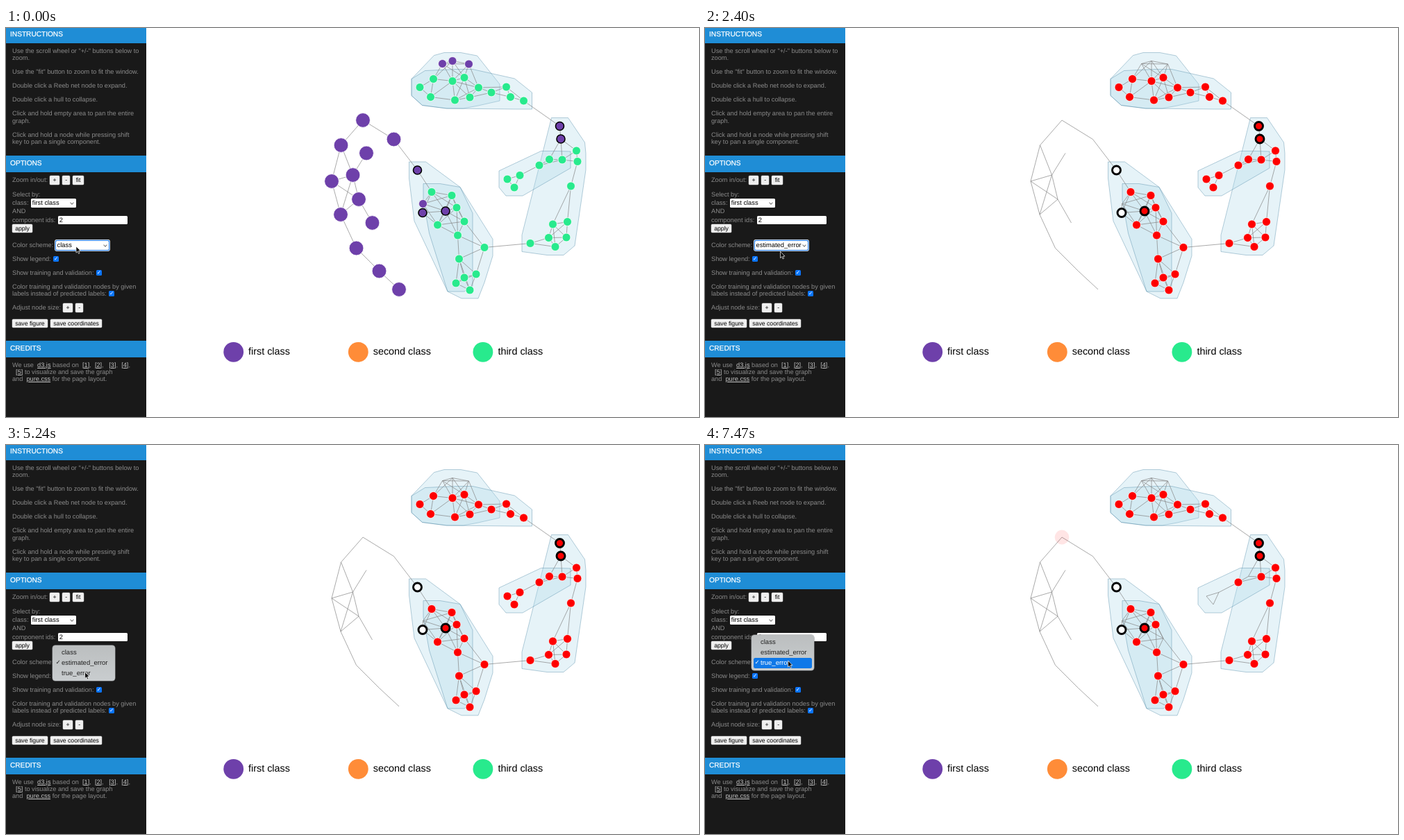
Animation, 998 px wide and 561 px high, one loop 8000 ms. Source, as an HTML page:

```html
<!DOCTYPE html>
<html lang="en">
<head>
<meta charset="utf-8">
<title>Reeb net viewer</title>
<style>
html, body { margin: 0; width: 100%; height: 100%; overflow: hidden; background: #fff; }
body { font-family: "Liberation Sans", Arial, sans-serif; text-rendering: geometricPrecision; }
svg { position: absolute; left: 0; top: 0; }
aside { position: absolute; width: 202px; height: 561px; overflow: hidden; background: #191919; }
section { position: absolute; width: 100%; }
h2 { margin: 0 0 6px; padding-left: 6px; font: 10.15px/24px "Liberation Sans", Arial, sans-serif;
  color: #fff; background: #1f8dd6; -webkit-text-stroke: .25px #fff; }
p { margin: 0 0 9.7px 9px; font-size: 9.2px; line-height: 10.3px; color: #8b8b8b; white-space: pre; }
.form { margin-bottom: 13px; line-height: 12.2px; }
.save { margin-top: 12px; }
u { color: #c4c4c4; }
p b, p i { display: inline-block; box-sizing: border-box; overflow: hidden; height: 12.5px; margin: -2px .8px;
  vertical-align: -1.5px; font: 8.7px/12.5px "Liberation Sans", Arial, sans-serif; color: #000; border-radius: 1.5px; }
p b { padding: 0 4.2px; background: #efefef; box-shadow: 0 0 0 .5px #777; }
p i { position: relative; padding-left: 2px; font-size: 9.3px; background: #fff; }
p .pick::after { content: ""; position: absolute; right: 3.5px; top: 3.5px; width: 3px; height: 3px;
  border: solid #777; border-width: 0 .9px .9px 0; transform: rotate(45deg); }
p .focus { box-shadow: 0 0 0 1.3px #2b7de0, 0 0 0 2px #fff; }
p .check { width: 8px; height: 8px; margin: 0 .8px; padding: 0; vertical-align: -.6px;
  font: 7.5px/8px "DejaVu Sans", sans-serif; text-align: center; color: #fff; background: #0b75ff; }
#menu { position: absolute; left: 67px; box-sizing: border-box; width: 89.5px; height: 51px; padding: 2.7px 3px;
  border-radius: 4px; background: linear-gradient(#bbbebf, #c9cdcf); box-shadow: 0 0 0 .5px #8d9092; }
#menu div { position: relative; padding-left: 10px; border-radius: 2.5px; font-size: 9.5px; line-height: 15px; color: #222; }
#menu .active { color: #fff; background: #0f78e8; }
#menu .ticked::before { content: "✓"; position: absolute; left: 1.5px; font: 8.5px/15px "DejaVu Sans", sans-serif; }
.hull { fill: rgba(173, 216, 230, .3); stroke: rgba(70, 130, 160, .4); stroke-linejoin: round; }
.edge { stroke: #858585; stroke-width: .7; }
.legend { font-size: 14.4px; }
</style>
</head>
<body>
<svg id="graph" width="998" height="561"></svg>
<aside>
<section style="top: -2px"><h2>INSTRUCTIONS</h2>
<p>Use the scroll wheel or "+/-" buttons below to
zoom.</p>
<p>Use the "fit" button to zoom to fit the window.</p>
<p>Double click a Reeb net node to expand.</p>
<p>Double click a hull to collapse.</p>
<p>Click and hold empty area to pan the entire
graph.</p>
<p>Click and hold a node while pressing shift
key to pan a single component.</p></section>
<section style="top: 184px"><h2>OPTIONS</h2>
<p>Zoom in/out: <b>+</b> <b>-</b> <b>fit</b></p>
<p class="form">Select by:
class: <i class="pick" style="width: 65px">first class</i>
AND
component ids: <i style="width: 100.5px">2</i>
<b style="margin-left: 0">apply</b></p>
<p>Color scheme: <i id="chosen" class="pick focus" style="width: 76.5px"></i></p>
<p>Show legend: <i class="check">✓</i></p>
<p>Show training and validation: <i class="check">✓</i></p>
<p>Color training and validation nodes by given
labels instead of predicted labels: <i class="check">✓</i></p>
<p>Adjust node size: <b>+</b> <b>-</b></p>
<p class="save"><b style="margin-left: 0">save figure</b> <b>save coordinates</b></p></section>
<section style="top: 450.5px"><h2>CREDITS</h2>
<p>We use  <u>d3.js</u> based on  <u>[1]</u>,  <u>[2]</u>,   <u>[3]</u>,  <u>[4]</u>,
  <u>[5]</u> to visualize and save the graph
and  <u>pure.css</u> for the page layout.</p></section>
</aside>
<div id="menu"></div>
<svg width="998" height="561"><path id="cursor" d="M0 0v9.2l2.1-2 1.5 3.3 1.5-.7-1.5-3.2h2.9z" stroke="#fff" stroke-width=".7"/></svg>
<script>
const LOOP = 8000, HULL_PAD = 12, BRIDGE_REACH = 70;
const PURPLE = '#6e40aa', ORANGE = '#ff8c38', GREEN = '#28ea8d', RED = '#fe0000';
const SCHEMES = ['class', 'estimated_error', 'true_error'];

// The first `purple` nodes are first class, the first `sure` of them have no estimated error;
// `right` nodes have no true error, `ends` join only their nearest neighbour.
const clusters = [
  { reach: 60, radius: 10.4, purple: 12, sure: 12, ends: [3, 8],
    nodes: [[514, 133], [558.5, 160.5], [482.5, 169], [519, 180.5], [499.5, 212], [469, 221],
      [508, 247], [482, 269], [527.5, 281], [504.5, 317.5], [537.5, 350.5], [566, 377]] },
  { reach: 48, radius: 6, purple: 4, sure: 3, rings: [0, 2, 3], right: [8], hulls: [[0], [4, 13]],
    nodes: [[592.5, 205], [600.5, 253.5], [600, 266.5], [633, 264], [613, 236.5], [642, 241.5],
      [649, 259], [621.5, 284], [660, 279], [650.5, 299], [652.5, 333], [660, 360], [648, 368],
      [689, 316.5], [677, 355], [668, 378]] },
  { reach: 41, radius: 6, purple: 3, sure: 3, hulls: [[0, 12], [3]],
    nodes: [[628.5, 51.5], [643, 47.5], [666.5, 52], [615.5, 73.5], [643, 76.5], [660, 71.5], [596, 85.5],
      [611.5, 99.5], [646.5, 104], [668, 100], [680.5, 86], [699, 93], [720.5, 85], [726.5, 99.5], [745.5, 105]] },
  { reach: 38, radius: 6, purple: 2, sure: 0, rings: [0, 1], right: [12, 14, 15, 16], hulls: [[0, 12], [11]],
    links: [[4, 5], [4, 6]],
    nodes: [[797.5, 141.5], [799, 160], [821.5, 177], [823, 192.5], [813.5, 228], [808.5, 279.5], [787.5, 283],
      [781.5, 302.5], [807, 302], [755, 310.5], [791, 315.5], [801, 190], [782.5, 189.5], [768, 198],
      [740, 212.5], [722, 218], [732, 230]] }
];

const dist = (a, b) => Math.hypot(a[0] - b[0], a[1] - b[1]);
const line = (a, b) => `<line class="edge" x1="${a[0]}" y1="${a[1]}" x2="${b[0]}" y2="${b[1]}"/>`;

function convexHull(points) {
  const half = pts => {
    const out = [];
    for (const p of pts) {
      while (out.length > 1) {
        const [a, b] = out.slice(-2);
        if ((b[0] - a[0]) * (p[1] - a[1]) - (b[1] - a[1]) * (p[0] - a[0]) > 0) break;
        out.pop();
      }
      out.push(p);
    }
    return out.slice(0, -1);
  };
  const sorted = [...points].sort((a, b) => a[0] - b[0] || a[1] - b[1]);
  return [...half(sorted), ...half(sorted.reverse())];
}

function hull(nodes) {
  const pad = [-HULL_PAD, HULL_PAD];
  const corners = nodes.flatMap(([x, y]) => pad.flatMap(dx => pad.map(dy => [x + dx, y + dy])));
  return `<polygon class="hull" points="${convexHull(corners).join(' ')}"/>`;
}

function innerEdges({ nodes, reach, ends = [], links = [] }) {
  const out = links.map(([i, j]) => line(nodes[i], nodes[j]));
  nodes.forEach((a, i) => {
    const others = nodes.filter(n => n !== a);
    if (ends.includes(i)) out.push(line(a, others.sort((p, q) => dist(a, p) - dist(a, q))[0]));
    else nodes.forEach((b, j) => {
      if (j > i && !ends.includes(j) && dist(a, b) < reach) out.push(line(a, b));
    });
  });
  return out;
}

// Neighbouring clusters are joined by their closest pair of nodes.
function bridges() {
  return clusters.flatMap((c, i) => clusters.slice(i + 1).map(other => {
    const pairs = c.nodes.flatMap(a => other.nodes.map(b => [a, b]));
    const [a, b] = pairs.reduce((best, p) => dist(...p) < dist(...best) ? p : best);
    return dist(a, b) < BRIDGE_REACH ? line(a, b) : '';
  }));
}

const legend = [[PURPLE, 'first class'], [ORANGE, 'second class'], [GREEN, 'third class']].map(([color, name], i) =>
  `<circle cx="${327.7 + 179.6 * i}" cy="467.3" r="14.4" fill="${color}"/>
   <text class="legend" x="${349 + 179.7 * i}" y="471.2">${name}</text>`);

const byId = id => document.getElementById(id);
byId('graph').innerHTML = [
  ...clusters.flatMap(c => (c.hulls || []).map(range => hull(c.nodes.slice(...range)))),
  ...clusters.flatMap(innerEdges),
  ...bridges(),
  ...clusters.flatMap(c => c.nodes.map(([x, y]) => `<circle class="node" cx="${x}" cy="${y}" r="${c.radius}"/>`)),
  ...legend
].join('');
byId('menu').innerHTML = SCHEMES.map(s => `<div>${s}</div>`).join('');

const circles = [...document.querySelectorAll('.node')];
const items = [...byId('menu').children];
const states = clusters.flatMap(c => c.nodes.map((_, i) => ({
  purple: i < c.purple,
  sure: i < c.sure,
  ring: (c.rings || []).includes(i),
  right: (c.right || []).includes(i)
})));

let shown = -1;
function applyScheme(scheme) {
  if (scheme === shown) return;
  shown = scheme;
  byId('chosen').textContent = SCHEMES[scheme];
  states.forEach((n, i) => {
    const { style } = circles[i];
    const clear = scheme > 0 && (n.sure || (scheme === 2 && n.right));
    const faint = scheme === 2 && i === 0;
    style.fill = !scheme ? (n.purple ? PURPLE : GREEN) : clear && n.ring ? '#fff' : RED;
    style.fillOpacity = faint ? .1 : clear && !n.ring ? 0 : 1;
    style.stroke = n.ring ? '#000' : clear ? 'none' : '#fff';
    style.strokeWidth = n.ring ? (scheme ? 2.9 : 1.6) : .8;
  });
}

// Each menu picks the next scheme: times of opening, hovering that row, pressing and releasing.
const picks = [[560, 1400, 1740, 2070], [3870, 4600, 5240, 5670], [7370, LOOP, LOOP, LOOP]];
const FADE_DELAY = 80, FADE = 200, APPLY_DELAY = 200;

function drawMenu(t) {
  const ticked = picks.findIndex(p => t >= p[0] && t < p[3] + FADE_DELAY + FADE);
  const menu = byId('menu');
  menu.style.display = ticked < 0 ? 'none' : '';
  if (ticked < 0) return;
  const [, hover, press, release] = picks[ticked];
  const active = t < hover ? ticked : t < press || t >= release ? ticked + 1 : -1;
  menu.style.top = 304 - 15 * ticked + 'px';
  menu.style.opacity = Math.min(1, 1 - (t - release - FADE_DELAY) / FADE);
  items.forEach((item, i) => {
    item.classList.toggle('active', i === active);
    item.classList.toggle('ticked', i === ticked);
  });
}

// Cursor moves: start, end, x, y.
const moves = [[330, 331, 105, 315.5], [900, 1570, 108.5, 322.5], [3040, 3770, 113, 314],
  [4440, 4770, 113.7, 327.5], [6840, 7300, 119.5, 311]];

function drawCursor(t) {
  let x = 101, y = 315;
  for (const [start, end, toX, toY] of moves) {
    const p = Math.max(0, Math.min(1, (t - start) / (end - start)));
    x += (toX - x) * p;
    y += (toY - y) * p;
  }
  byId('cursor').setAttribute('transform', `translate(${x} ${y})`);
}

function draw() {
  const t = performance.now() % LOOP;
  applyScheme(picks.filter(p => t >= p[3] + APPLY_DELAY).length);
  drawMenu(t);
  drawCursor(t);
  requestAnimationFrame(draw);
}
draw();
</script>
</body>
</html>
```
